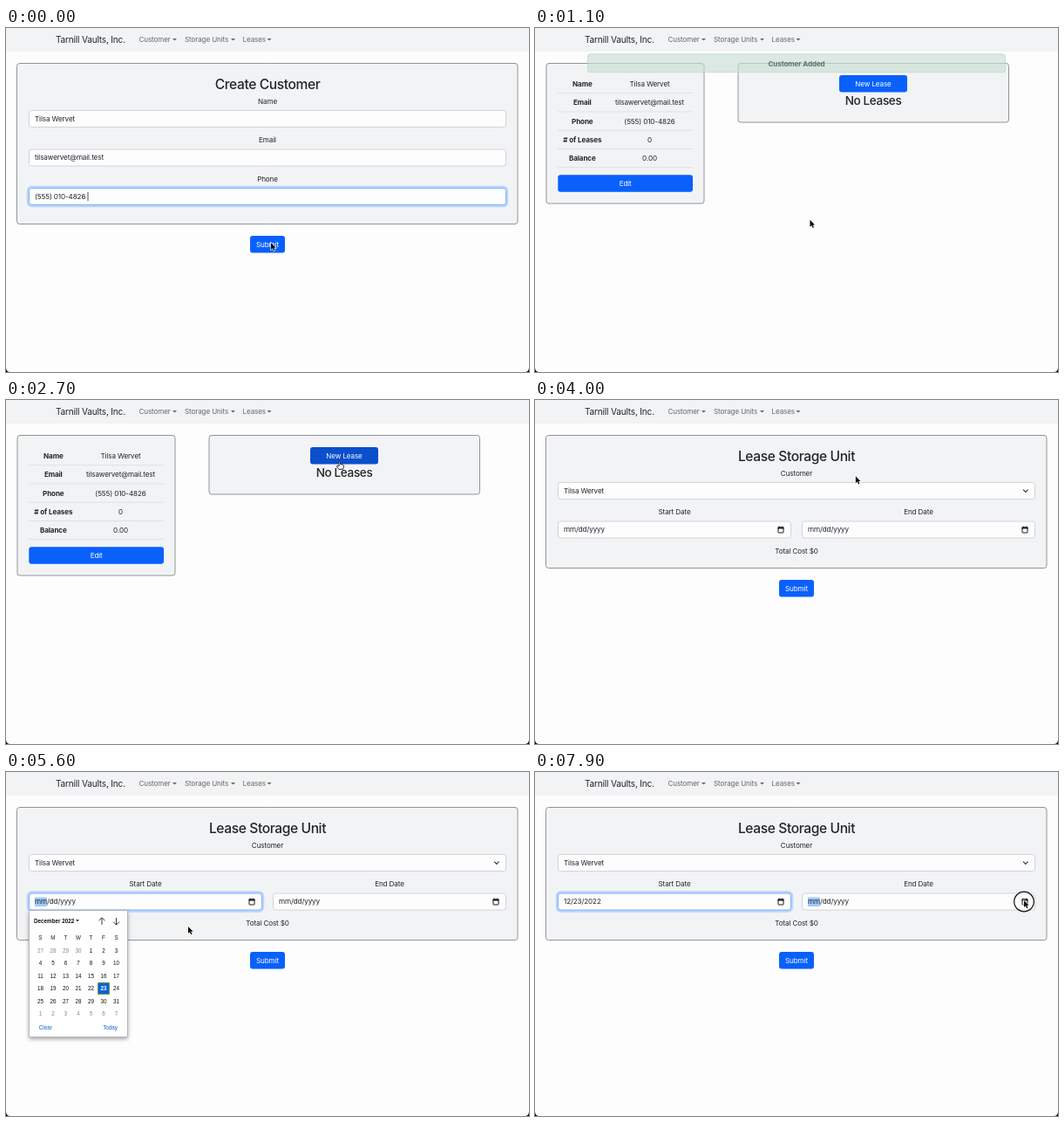
An HTML page with a canvas for the animation above (8 s loop, 600 by 394 pixels).

```html
<!DOCTYPE html>
<html lang="en">
<head>
<meta charset="utf-8">
<title>Storage rental walkthrough</title>
<style>
  html, body { margin: 0; width: 100%; height: 100%; overflow: hidden; background: #fdfdfd; }
  canvas { display: block; width: 600px; height: 394px; }
</style>
</head>
<body>
<canvas id="stage" width="600" height="394"></canvas>
<script>
const ctx = document.getElementById('stage').getContext('2d');
const LOOP = 8000;
const UI = 'Inter, Roboto, sans-serif';
const PICKER = '"Liberation Sans", sans-serif';
const INK = '#212529', PANEL = '#f2f3f5', BLUE = '#0a60fb', BLUE_DARK = '#0a4fcb';
const BRAND = 'Tarnill Vaults, Inc.';
const PERSON = { name: 'Tilsa Wervet', email: 'tilsawervet@mail.test', phone: '(555) 010-4826' };

// Pointer path: time, x, y of the hot spot
const PATH = [
  [0, 304, 246], [1000, 304, 246], [1300, 338, 168], [1600, 375, 90], [1800, 383, 70],
  [3900, 383, 70], [4000, 368, 87], [4400, 312, 163], [4800, 281, 211], [4950, 282, 190],
  [5150, 281, 146], [5300, 281, 146], [5600, 209, 177], [5700, 206, 180], [6000, 155, 216],
  [6300, 112, 246], [6700, 112, 246], [7100, 390, 180], [7400, 550, 149], [7600, 561, 147], [8000, 561, 147]
];

const clamp = v => Math.max(0, Math.min(1, v));
const mix = (a, b, p) => a + (b - a) * p;

function pointerAt(t) {
  const i = Math.max(1, PATH.findIndex(k => k[0] >= t));
  const [t0, x0, y0] = PATH[i - 1], [t1, x1, y1] = PATH[i];
  const p = clamp((t - t0) / (t1 - t0));
  return [mix(x0, x1, p), mix(y0, y1, p)];
}

function text(str, x, y, { size = 8.1, weight = 400, color = INK, align = 'left', spacing = -0.12, font = UI } = {}) {
  ctx.font = `${weight} ${size}px ${font}`;
  ctx.letterSpacing = spacing + 'px';
  ctx.textAlign = align;
  ctx.fillStyle = color;
  ctx.fillText(str, x, y + size * 0.36);
}
const centered = (str, x, y, style) => text(str, x, y, { align: 'center', ...style });
const heading = (str, x, y, size) => centered(str, x, y, { size, weight: 500, spacing: -0.4 });

function box(x, y, w, h, r, fill, stroke, line = 1) {
  ctx.beginPath();
  ctx.roundRect(x, y, w, h, r);
  if (fill) { ctx.fillStyle = fill; ctx.fill(); }
  if (stroke) { ctx.strokeStyle = stroke; ctx.lineWidth = line; ctx.stroke(); }
}

function poly(points, fill) {
  ctx.beginPath();
  points.forEach(([x, y]) => ctx.lineTo(x, y));
  ctx.closePath();
  ctx.fillStyle = fill;
  ctx.fill();
}

function lines(color, width, ...strokes) {
  ctx.beginPath();
  for (const stroke of strokes)
    stroke.forEach(([x, y], i) => i ? ctx.lineTo(x, y) : ctx.moveTo(x, y));
  ctx.strokeStyle = color;
  ctx.lineWidth = width;
  ctx.stroke();
}

const triangle = (x, y, w, color) => poly([[x, y], [x + w, y], [x + w / 2, y + w / 2]], color);
const card = (x, y, w, h) => box(x, y, w, h, 3, PANEL, '#929496');

function button(label, x, y, w, h, color = BLUE) {
  box(x, y, w, h, 3, color);
  centered(label, x + w / 2, y + h / 2, { color: '#fff' });
}

function field(value, x, y, w, focused) {
  if (focused) box(x - 1, y - 1, w + 2, 21, 4, null, '#b9d5fd', 3.4);
  box(x, y, w, 19, 3, '#fdfdfd', focused ? '#80b1fb' : '#d0d4d9');
  text(value, x + 6.5, y + 9.5);
}

function calendarIcon(x, y) {
  box(x - 3, y - 2.5, 6, 6, 0.5, null, '#16181a', 1);
  ctx.fillStyle = '#16181a';
  ctx.fillRect(x - 3.5, y - 3, 7, 2);
  ctx.fillRect(x - 2.4, y - 4, 1, 1);
  ctx.fillRect(x + 1.4, y - 4, 1, 1);
}

function dateField(value, x, focused, selected) {
  field('', x, 139, 267, focused);
  if (selected) {
    ctx.fillStyle = '#9fcafb';
    ctx.fillRect(x + 6.5, 143.5, 14, 10.5);
  }
  text(value, x + 6.5, 148.5);
  calendarIcon(x + 255.5, 148.5);
}

function navbar() {
  ctx.fillStyle = '#fdfdfd';
  ctx.fillRect(0, 0, 600, 394);
  ctx.fillStyle = PANEL;
  ctx.fillRect(0, 0, 600, 27);
  text(BRAND, 57, 13.5, { size: 10.1, spacing: -0.2 });
  for (const [label, x, caret] of [['Customer', 152.5, 191], ['Storage Units', 205, 258], ['Leases', 271.5, 299.5]]) {
    text(label, x, 13.5, { color: '#66686a' });
    triangle(caret, 12, 5, '#66686a');
  }
}

function createPage(t) {
  card(12.5, 40.5, 574.5, 184);
  heading('Create Customer', 300, 64, 15.6);
  ['Name', 'Email', 'Phone'].forEach((label, i) => {
    const y = 84 + i * 44.5;
    centered(label, 300, y);
    field(PERSON[label.toLowerCase()], 26.5, y + 10.5, 547, i === 2);
  });
  if (t < 200) lines(INK, 0.8, [[94, 188], [94, 198]]);
  button('Submit', 280, 238, 40, 19.5);
}

function customerPage(t) {
  card(13, 40.5, 181, 160.5);
  const rows = [['Name', PERSON.name], ['Email', PERSON.email], ['Phone', PERSON.phone],
    ['# of Leases', '0'], ['Balance', '0.00']];
  rows.forEach(([label, value], i) => {
    const y = 64.3 + i * 21.25;
    centered(label, 54.3, y, { weight: 700 });
    centered(value, 131.5, y);
    lines('#dadcdf', 0.8, [[26, y + 10.4], [181, y + 10.4]]);
  });
  button('Edit', 26.3, 168.3, 154.7, 19.5);

  card(233, 40.5, 310.5, 67.5);
  const shade = t >= 2700 ? BLUE_DARK : t >= 1800 ? '#0b58e6' : BLUE;
  button('New Lease', 349, 54, 78, 19.5, shade);
  heading('No Leases', 388, 83, 13.6);

  if (t < 2700) {
    ctx.globalAlpha = clamp((t - 500) / 800) ** 1.5;
    box(60.5, 29.8, 479, 21, 3, '#c9dfd4', '#b5d3c4');
    centered('Customer Added', 300, 40.7, { weight: 700, color: '#20392f' });
    ctx.globalAlpha = 1;
  }
}

function datePicker() {
  ctx.save();
  ctx.shadowColor = 'rgba(0,0,0,.4)';
  ctx.shadowBlur = 5;
  ctx.shadowOffsetY = 2;
  box(26.5, 158.5, 113, 145, 0.5, '#fff');
  ctx.restore();
  box(26.5, 158.5, 113, 145, 0.5, null, '#aaadb0', 0.8);

  const small = { size: 6.3, font: PICKER, spacing: 0 };
  text('December 2022', 32, 170.5, { ...small, weight: 700, color: '#111' });
  triangle(80, 169.3, 4, '#111');
  lines('#222', 0.9,
    [[110, 175], [110, 167]], [[106.5, 170.3], [110, 166.8], [113.5, 170.3]],
    [[126.5, 167], [126.5, 175]], [[123, 171.7], [126.5, 175.2], [130, 171.7]]);

  for (let col = 0; col < 7; col++) {
    const x = 39.4 + col * 14.52;
    centered('SMTWTFS'[col], x, 189.5, { ...small, color: '#222' });
    for (let row = 0; row < 6; row++) {
      const y = 204.5 + row * 14.5;
      const n = row * 7 + col - 3;
      const day = n < 1 ? n + 30 : n > 31 ? n - 31 : n;
      const today = n === 23;
      if (today) box(x - 6.6, y - 6.7, 13.2, 13.2, 0.5, '#0b62dc', '#78982f', 0.9);
      centered(String(day), x, y,
        { ...small, weight: today ? 700 : 400, color: today ? '#fff' : n === day ? '#111' : '#85878a' });
    }
  }
  centered('Clear', 45.3, 293, { ...small, color: '#0b62dc' });
  centered('Today', 119.6, 293, { ...small, color: '#0b62dc' });
}

function leasePage(t) {
  const picked = t >= 6600, opened = t >= 5200;
  card(12.5, 40.5, 574.5, 152);
  heading('Lease Storage Unit', 300, 64, 15.6);
  centered('Customer', 300, 84);
  field(PERSON.name, 26.5, 94.5, 547);
  lines('#2f3438', 1.1, [[560, 102.7], [562.8, 105.5], [565.6, 102.7]]);
  centered('Start Date', 160, 128.5);
  centered('End Date', 440, 128.5);
  dateField(picked ? '12/23/2022' : 'mm/dd/yyyy', 26.5, opened, opened && !picked);
  dateField('mm/dd/yyyy', 306.5, false, t >= 7900);
  centered('Total Cost $0', 300, 173);
  button('Submit', 280, 206, 40, 19.5, t >= 4850 && t < 4950 ? '#0b58e6' : BLUE);
  if (opened && !picked) datePicker();
}

function arrow() {
  ctx.beginPath();
  for (const [x, y] of [[0, 0], [0, 8], [1.9, 6.3], [3.2, 9.2], [4.5, 8.6], [3.2, 5.8], [5.7, 5.8]]) ctx.lineTo(x, y);
  ctx.closePath();
  ctx.strokeStyle = '#fff';
  ctx.lineWidth = 1.2;
  ctx.stroke();
  ctx.fillStyle = '#0c0c0c';
  ctx.fill();
}

function hand() {
  ctx.beginPath();
  ctx.moveTo(-1, 5.2);
  ctx.lineTo(-1, 1);
  ctx.quadraticCurveTo(-0.2, -0.4, 0.6, 1);
  ctx.lineTo(0.6, 3.6);
  ctx.lineTo(3.6, 4.2);
  ctx.quadraticCurveTo(4.8, 4.6, 4.4, 6.3);
  ctx.lineTo(3.5, 9.3);
  ctx.lineTo(-1.2, 9.3);
  ctx.lineTo(-3.7, 6);
  ctx.quadraticCurveTo(-3.4, 4.4, -1, 6);
  ctx.closePath();
  ctx.fillStyle = '#fff';
  ctx.fill();
  ctx.strokeStyle = '#171717';
  ctx.lineWidth = 0.9;
  ctx.stroke();
}

function pointer(t) {
  const [x, y] = pointerAt(t);
  const within = (from, to) => t >= from && t < to;
  ctx.save();
  ctx.translate(x, y);
  if (within(5150, 5300) || t >= 7900) {
    ctx.beginPath();
    ctx.arc(0, 1.5, 11.3, 0, Math.PI * 2);
    ctx.strokeStyle = '#111';
    ctx.lineWidth = 1.2;
    ctx.stroke();
  }
  within(1750, 3000) || within(4780, 4900) ? hand() : arrow();
  ctx.restore();
}

function windowCorners() {
  for (const [x, dir] of [[0, 1], [600, -1]]) {
    ctx.beginPath();
    ctx.moveTo(x, 394);
    ctx.lineTo(x, 389);
    ctx.quadraticCurveTo(x, 394, x + dir * 5, 394);
    ctx.closePath();
    ctx.fillStyle = '#000';
    ctx.fill();
  }
}

function draw(now) {
  const t = now % LOOP;
  navbar();
  if (t < 500) createPage(t);
  else if (t < 3000) customerPage(t);
  else leasePage(t);
  pointer(t);
  windowCorners();
}

const start = performance.now();
function tick() {
  draw(performance.now() - start);
  requestAnimationFrame(tick);
}
tick();
</script>
</body>
</html>
```
